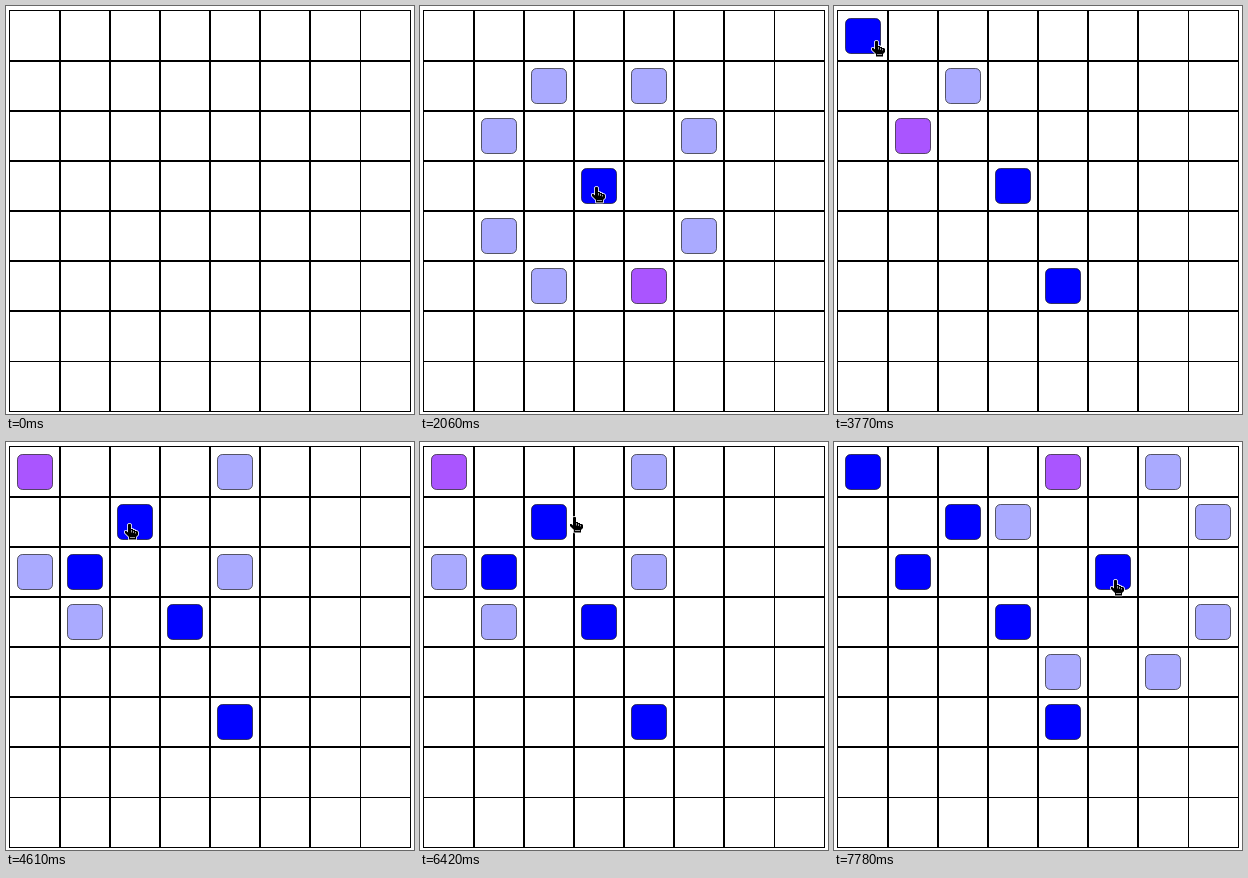
Animation of 408 by 408 pixels, one loop 8 s. Source, as an HTML page with a canvas:

```html
<!DOCTYPE html>
<html lang="en">
<head>
<meta charset="utf-8">
<title>Knight path</title>
<style>
html, body { margin: 0; width: 100%; height: 100%; overflow: hidden; background: #fff; }
canvas { display: block; width: 408px; height: 408px; }
</style>
</head>
<body>
<canvas id="board" width="408" height="408"></canvas>
<script>
const ctx = document.getElementById('board').getContext('2d');
const LOOP = 8000, STEP = 40, SIZE = 8, CELL = 50;
const BLUE = '#0000ff', LIGHT = '#aaaaff', PURPLE = '#aa55ff';

// Clicked cells: time, column, row. Clicking the previous cell undoes a move.
const clicks = [
  [910, 4, 5], [2060, 3, 3], [2910, 1, 2], [3770, 0, 0], [4610, 2, 1],
  [5330, 1, 3], [6170, 2, 1], [6840, 4, 0], [7780, 5, 2]
];

// Pointer moves: start time, steps, end point, optional curve control point.
const home = [29, 0];
const moves = [
  { start: 80, steps: 12, to: [234, 272], via: [312, 136], entering: true },
  { start: 1280, steps: 13, to: [170, 180], via: [184, 218] },
  { start: 2290, steps: 8, to: [82, 144] },
  { start: 3250, steps: 9, to: [36, 34] },
  { start: 4090, steps: 5, to: [117, 81] },
  { start: 4850, steps: 8, to: [65, 177] },
  { start: 5590, steps: 10, to: [132, 81] },
  { start: 6340, steps: 8, to: [221, 32], via: [184, 59] },
  { start: 6960, steps: 14, to: [275, 137], via: [212, 80] }
];

const same = (a, b) => a[0] === b[0] && a[1] === b[1];

function pathAt(time) {
  const path = [];
  for (const [at, col, row] of clicks) {
    if (at > time) break;
    const cell = [col, row];
    if (path.length > 1 && same(path[path.length - 2], cell)) path.pop();
    else path.push(cell);
  }
  return path;
}

function knightMoves([col, row]) {
  const cells = [];
  for (let y = 0; y < SIZE; y++)
    for (let x = 0; x < SIZE; x++)
      if (Math.abs((x - col) * (y - row)) === 2) cells.push([x, y]);
  return cells;
}

function pointerAt(time) {
  let from = home;
  for (const { start, steps, to, via, entering } of moves) {
    if (time < start) break;
    const p = Math.min(1, Math.floor((time - start) / STEP) / steps);
    const e = entering ? 1 - (1 - p) ** 2 : p * p * (3 - 2 * p);
    const origin = from;
    from = to.map((end, i) => {
      const bend = via ? via[i] : (origin[i] + end) / 2;
      return Math.round((1 - e) ** 2 * origin[i] + 2 * e * (1 - e) * bend + e * e * end);
    });
  }
  return from;
}

function drawGrid() {
  ctx.fillStyle = '#000';
  const span = SIZE * CELL + 2;
  const column = x => ctx.fillRect(x, 4, 1, span);
  const line = y => ctx.fillRect(3, y, span, 1);
  for (let i = 0; i < SIZE; i++) {
    if (i < SIZE - 1) {
      column(3 + i * CELL);
      line(4 + i * CELL);
    }
    column(54 + i * CELL);
    line(55 + i * CELL);
  }
}

function drawTile([col, row], color) {
  ctx.beginPath();
  ctx.roundRect(11.5 + col * CELL, 12.5 + row * CELL, 35, 35, 5);
  ctx.fillStyle = color;
  ctx.fill();
  ctx.strokeStyle = 'rgba(0, 0, 0, 0.6)';
  ctx.lineWidth = 1;
  ctx.stroke();
}

const hand = new Path2D(
  'M5 1.5Q6.5 0 8 1.5V6H10V7H12V8H14L15 9V12L13 14V16.5H6V14L2 10V8H3.5L5 9.5Z');
const fingerGaps = new Path2D('M8.5 7V9.5M10.5 8V10M12.5 9V10.5M7 14.5H12');

function drawHand([x, y]) {
  ctx.save();
  ctx.translate(x, y);
  ctx.lineJoin = 'round';
  ctx.strokeStyle = '#fff';
  ctx.lineWidth = 1.6;
  ctx.stroke(hand);
  ctx.fillStyle = '#000';
  ctx.fill(hand);
  ctx.lineWidth = 0.6;
  ctx.stroke(fingerGaps);
  ctx.restore();
}

function draw(time) {
  ctx.fillStyle = '#fff';
  ctx.fillRect(0, 0, 408, 408);
  drawGrid();
  const path = pathAt(time);
  if (path.length) {
    knightMoves(path[path.length - 1]).forEach(cell => {
      if (!path.some(used => same(used, cell))) drawTile(cell, LIGHT);
    });
    path.forEach((cell, i) => drawTile(cell, i === path.length - 2 ? PURPLE : BLUE));
  }
  if (time >= moves[0].start) drawHand(pointerAt(time));
}

const began = performance.now();
function tick() {
  draw((performance.now() - began) % LOOP);
  requestAnimationFrame(tick);
}
tick();
</script>
</body>
</html>
```
